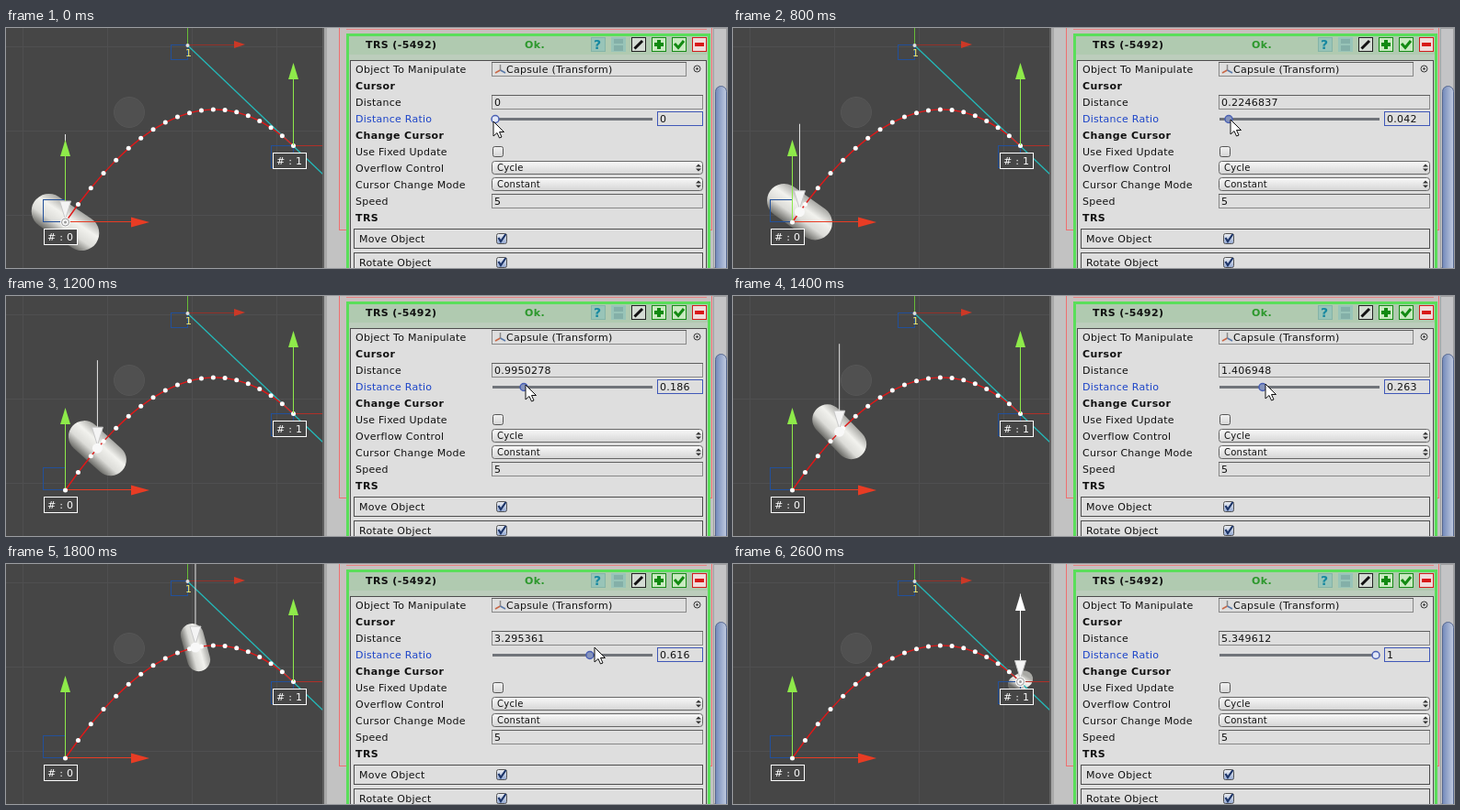
An HTML page with a canvas that plays this animation: 784 px wide and 262 px high, repeating every 3.2 s.

```html
<!DOCTYPE html>
<html lang="en">
<head>
<meta charset="utf-8">
<style>
html, body { margin: 0; width: 100%; height: 100%; overflow: hidden; background: #464646; }
canvas { display: block; }
</style>
</head>
<body>
<canvas id="stage" width="784" height="262"></canvas>
<script>
const ctx = document.getElementById('stage').getContext('2d');
const LOOP = 3200, STEP = 200, LENGTH = 5.349612;
const WHITE = '#fff', RED = '#e83c24', GREEN = '#8eea4a', BLUE = '#22509a', PANEL = '#dedede';

// One entry per step: ratio, pointer x, pointer y
const steps = [
  [0, 530, 102], [0, 531, 102], [0, 533, 101], [.018, 537, 101], [.042, 541, 100],
  [.108, 553, 99], [.186, 565, 97], [.263, 579, 96], [.45, 608, 94],
  [.616, 640, 91], [.81, 673, 92], [1, 722, 98], [1, 694, 112], [1]
];
// Capsule poses: ratio, radius, half length, angle in degrees
const poses = [
  [0, 19, 21.5, 34], [.108, 18, 19.6, 38], [.263, 16.5, 18.7, 46],
  [.616, 12.5, 14, 75], [1, 9, 5.5, 148]
];
const start = [64.5, 212], bend = [197.5, 19], end = [312.5, 128.5];

function curve(t) {
  const s = 1 - t;
  return start.map((p, i) => s * s * p + 2 * s * t * bend[i] + t * t * end[i]);
}

// Position at a share of the arc length
const lengths = [0];
for (let i = 1; i <= 400; i++) {
  const [ax, ay] = curve((i - 1) / 400), [bx, by] = curve(i / 400);
  lengths.push(lengths[i - 1] + Math.hypot(bx - ax, by - ay));
}
const along = ratio => curve(lengths.findIndex(d => d >= ratio * lengths[400] - 1e-6) / 400);

function poseAt(ratio) {
  const i = Math.max(1, poses.findIndex(p => p[0] >= ratio));
  const a = poses[i - 1], b = poses[i], k = (ratio - a[0]) / (b[0] - a[0]);
  return a.map((v, j) => v + (b[j] - v) * k);
}

function gradient(x1, y1, x2, y2, ...colors) {
  const fill = ctx.createLinearGradient(x1, y1, x2, y2);
  colors.forEach((c, i) => fill.addColorStop(i / (colors.length - 1), c));
  return fill;
}

function rect(x, y, w, h, fill, stroke, lineWidth = 1) {
  if (fill) { ctx.fillStyle = fill; ctx.fillRect(x, y, w, h); }
  if (stroke) {
    ctx.strokeStyle = stroke;
    ctx.lineWidth = lineWidth;
    const inset = lineWidth / 2;
    ctx.strokeRect(x + inset, y + inset, w - lineWidth, h - lineWidth);
  }
}

function roundRect(x, y, w, h, r, fill, stroke) {
  ctx.beginPath();
  ctx.roundRect(x + .5, y + .5, w - 1, h - 1, r);
  ctx.fillStyle = fill;
  ctx.fill();
  ctx.strokeStyle = stroke;
  ctx.lineWidth = 1;
  ctx.stroke();
}

function line(points, color, width = 1) {
  ctx.strokeStyle = color;
  ctx.lineWidth = width;
  ctx.beginPath();
  points.forEach(p => ctx.lineTo(...p));
  ctx.stroke();
}

function shape(points, fill, stroke) {
  ctx.beginPath();
  points.forEach(p => ctx.lineTo(...p));
  ctx.closePath();
  ctx.fillStyle = fill;
  ctx.fill();
  if (stroke) { ctx.strokeStyle = stroke; ctx.lineWidth = 1; ctx.stroke(); }
}

function circle(x, y, r, fill, stroke, lineWidth = 1) {
  ctx.beginPath();
  ctx.arc(x, y, r, 0, 7);
  if (fill) { ctx.fillStyle = fill; ctx.fill(); }
  if (stroke) { ctx.strokeStyle = stroke; ctx.lineWidth = lineWidth; ctx.stroke(); }
}

function text(str, x, y, color = '#111', bold = false, size = 11) {
  ctx.font = `${bold ? 'bold ' : ''}${size}px "DejaVu Sans", sans-serif`;
  ctx.letterSpacing = bold ? '0.4px' : '0.25px';
  ctx.fillStyle = color;
  ctx.fillText(str, x, y);
}

function upArrow(x, from, tip, color) {
  line([[x, from], [x, tip + 18]], color);
  shape([[x, tip], [x + 5.5, tip + 18], [x - 5.5, tip + 18]], color);
}

function label(str, x, y) {
  rect(x, y, 37, 18, '#464646', WHITE);
  text(str, x + 4, y + 13, WHITE);
}

// Shaded across its axis: soft upper rim, bright middle, dark lower rim
function capsule(x, y, [, r, half, degrees]) {
  const a = degrees * Math.PI / 180, cos = Math.cos(a), sin = Math.sin(a);
  const dx = half * cos, dy = half * sin;
  const nx = r * sin, ny = -r * Math.abs(cos);
  const shade = gradient(x + nx, y + ny, x - nx, y - ny, '#a8a8a4', '#f2f2ee', '#dcdcd8', '#6c6c68');
  ctx.lineCap = 'round';
  line([[x - dx, y - dy], [x + dx, y + dy]], shade, r * 2);
  ctx.lineCap = 'butt';
}

function drawScene(ratio) {
  rect(0, 0, 345, 262, '#464646');
  for (let x = 18.5; x < 345; x += 92) line([[x, 0], [x, 262]], '#4f4f50');
  for (let y = 20.5; y < 262; y += 92) line([[0, y], [345, y]], '#4f4f50');
  circle(134, 92, 16.5, '#505050', '#565656');

  const [x, y] = along(ratio);
  capsule(x, y, poseAt(ratio));

  // Tangent handle
  line([[197.5, 0], [197.5, 20]], '#66bd38');
  line([bend, [345, 160]], '#24b8b8', 1.3);
  rect(179, 18, 19, 17, null, BLUE);
  line([[198, 18.5], [249, 18.5]], '#96322a');
  shape([[260, 18], [248, 14], [248, 22]], '#cc3826');
  circle(197.5, 19, 2, '#ddd');
  text('1', 195, 31, '#f0ec70');

  // End point axes
  rect(288, 128, 25, 25, null, BLUE);
  line([[313, 128.5], [344, 128.5]], '#b03028');

  // Start point axes
  rect(40, 187, 25, 25, null, BLUE);
  line([[65, 211.5], [137, 211.5]], RED);
  shape([[156, 212], [136, 206.5], [136, 217.5]], RED);

  const dots = Array.from({ length: 20 }, (_, i) => curve(i / 19));
  line(dots, '#e01818', 1.4);
  dots.forEach(p => circle(...p, 2.5, WHITE));

  line([[x, y - 96], [x, y - 22]], '#e6e6e6');
  upArrow(64.5, 210, 122, GREEN);
  if (ratio < 1) upArrow(312.5, 128, 38, GREEN);
  else upArrow(312.5, 128, 33, WHITE);
  shape([[x, y - 3], [x - 6, y - 23], [x + 6, y - 23]], '#f4f4f4', '#c8c8c8');
  circle(x, y, 5.5, '#f8f8f8');
  if (ratio === 0 || ratio === 1) {
    circle(x, y, 4, null, '#999');
    circle(x, y, 1.5, '#999');
  }
  label('# : 0', 41, 219);
  label('# : 1', 290, 136);
}

function field(x, y, w, value, focused) {
  rect(x, y, w, 16, PANEL, focused ? '#4058b8' : '#888');
  if (!focused) line([[x, y + .5], [x + w, y + .5]], '#5e5e5e');
  text(value, x + 3, y + 12);
}

function dropdown(y, value) {
  roundRect(528, y, 230, 15, 3, gradient(0, y, 0, y + 15, '#fafafa', '#d4d4d4'), '#666');
  text(value, 534, y + 11, '#111', false, 10);
  shape([[750, y + 6.5], [753, y + 3.5], [756, y + 6.5]], '#333');
  shape([[750, y + 8.5], [753, y + 11.5], [756, y + 8.5]], '#333');
}

function checkbox(x, y, checked) {
  roundRect(x, y, 12, 12, 2, gradient(0, y, 0, y + 12, '#f4f4f4', checked ? '#8ea4d0' : '#d4d4d4'), '#555');
  if (checked) line([[x + 2.5, y + 5], [x + 5, y + 9], [x + 10.5, y + 1]], '#1c3468', 2.2);
}

function drawButtons() {
  rect(636, 10, 16, 16, '#98c4b8', '#84b4a8');
  text('?', 639, 23, '#1688a0', true, 14);
  rect(658, 10, 16, 16, '#98c4b8');
  rect(661, 12, 10, 5, '#84b0a8');
  rect(661, 19, 10, 6, '#84b0a8');
  rect(680, 10, 16, 16, '#d4dcd4', '#222');
  line([[683.5, 22.5], [692, 14]], '#111', 3);
  rect(702, 10, 16, 16, '#c8eac0', '#168a16');
  line([[705, 18], [715, 18]], '#128a12', 4);
  line([[710, 13], [710, 23]], '#128a12', 4);
  rect(724, 10, 16, 16, '#c8eac0', '#168a16');
  line([[727, 17], [731, 21.5], [737, 14]], '#128a12', 3);
  rect(746, 10, 16, 16, '#f0dcdc', '#d01c1c');
  line([[749, 18], [759, 18]], '#d81818', 4);
}

function drawPanel(ratio, pressed) {
  rect(345, 0, 439, 262, '#c2c2c2');
  rect(344, 0, 2, 262, '#606060');
  rect(346, 0, 3, 262, '#a8a8a8');
  rect(362, -5, 406, 226, '#c8bfbf', '#ee7070');
  line([[370, 1.5], [762, 1.5]], '#e88080');
  rect(370, 6, 396, 270, '#bccdbc', '#5ade5a', 3);
  rect(373, 9, 390, 20, '#b0cab0');
  rect(374, 35, 388, 240, PANEL, '#4c4c4c');

  // Scroll bar
  rect(769, 0, 15, 262, '#c4c4c6', '#a0a0a2');
  roundRect(771, 63, 13, 220, 6, gradient(771, 0, 784, 0, '#6f86b8', '#c4cee2'), '#566890');

  text('TRS (-5492)', 391, 22, '#111', true);
  text('Ok.', 564, 22, '#2c982c', true);
  drawButtons();

  const rows = ['Object To Manipulate', '*Cursor', 'Distance', 'Distance Ratio', '*Change Cursor',
    'Use Fixed Update', 'Overflow Control', 'Cursor Change Mode', 'Speed', '*TRS'];
  rows.forEach((row, i) => {
    const bold = row[0] === '*';
    text(bold ? row.slice(1) : row, 380, 49 + 18 * i, i === 3 ? '#1c44c8' : '#111', bold);
  });

  field(528, 37, 212, '');
  line([[537.5, 46], [537.5, 40]], '#888', 1.5);
  line([[537.5, 46], [532, 49]], '#c86848', 1.5);
  line([[537.5, 46], [543, 49]], '#5878a8', 1.5);
  text('Capsule (Transform)', 544, 49);
  circle(751.5, 44.5, 3.5, null, '#333');
  circle(751.5, 44.5, 1.2, '#333');

  field(528, 73, 230, ratio ? String(+(ratio * LENGTH).toPrecision(7)) : '0');
  rect(529, 98, 174, 3, '#70747a');
  circle(532 + 167 * ratio, 99.5, 4, pressed ? '#8694bc' : '#e2e8f8', '#4a60b4', 1.5);
  field(708, 91, 50, String(ratio), true);

  checkbox(529, 129, false);
  dropdown(145, 'Cycle');
  dropdown(163, 'Constant');
  field(528, 181, 230, '5');
  ['Move Object', 'Rotate Object'].forEach((name, i) => {
    const y = 219 + 26 * i;
    rect(378, y, 380, 22, PANEL, '#4c4c4c');
    text(name, 384, y + 15);
    checkbox(533, y + 5, true);
  });
}

function drawPointer(x, y) {
  const outline = [[0, 0], [0, 16], [4, 12.5], [6.5, 18], [9, 17], [6.5, 11.5], [11.5, 11.5]];
  shape(outline.map(([dx, dy]) => [x + dx, y + dy]), WHITE, '#111');
}

function draw(now) {
  const step = Math.floor(now % LOOP / STEP);
  const [ratio, x, y] = steps[Math.min(step, steps.length - 1)];
  drawScene(ratio);
  drawPanel(ratio, step > 0 && step < 11);
  if (x) drawPointer(x, y);
  requestAnimationFrame(draw);
}
draw(performance.now());
</script>
</body>
</html>
```
